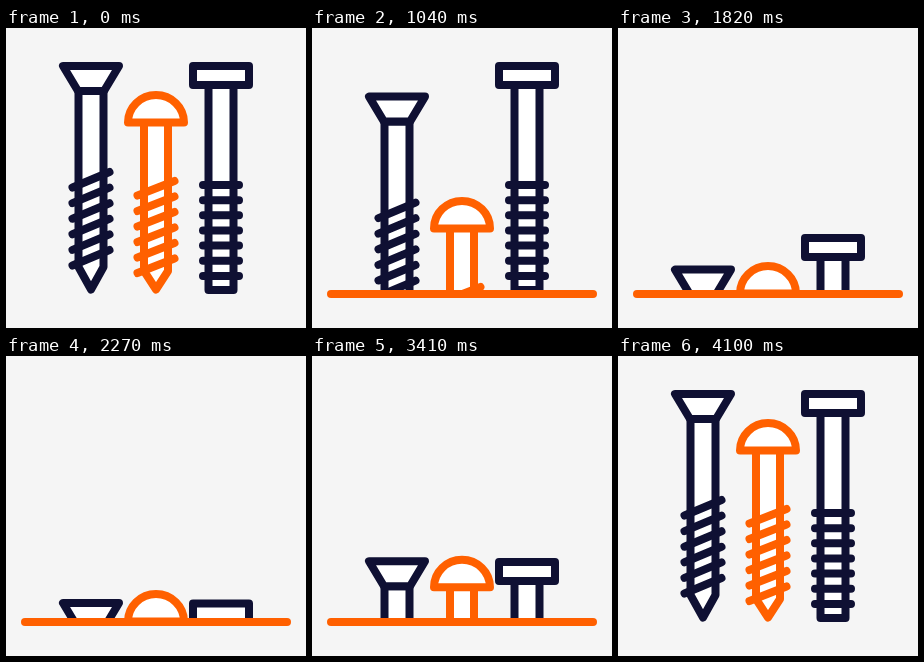
Animation, 300 px wide and 300 px high, one loop 4.16 s. Source, as an HTML page:

```html
<!DOCTYPE html>
<html lang="en">
<head>
<meta charset="utf-8">
<title>Screws</title>
<style>
  html, body { margin: 0; width: 100%; height: 100%; overflow: hidden; background: #f5f5f5; }
  svg { display: block; width: 100%; height: 100%; }
  g, #ground { stroke-width: 8; stroke-linecap: round; stroke-linejoin: round; }
  g { stroke: #0f1033; fill: #fff; }
  #round, #ground { stroke: #ff6000; }
</style>
</head>
<body>
<svg viewBox="0 0 300 300">
  <clipPath id="above"><rect width="300" height="266"/></clipPath>
  <g clip-path="url(#above)">
    <g id="flat">
      <path d="M72.5 63V239L85 261.5L97.5 239V63Z"/>
      <path d="M57 38H113L98 63H72Z"/>
    </g>
    <g id="hex">
      <path d="M202.5 57V262H227.5V57Z"/>
      <path d="M187 38H243V57H187Z"/>
    </g>
    <g id="round">
      <path d="M138 94V243L150 261.5L162 243V94Z"/>
      <path d="M122 94.5A28 27.5 0 0 1 178 94.5Z"/>
    </g>
  </g>
  <path id="ground"/>
</svg>
<script>
const LOOP = 4160;
const OUT = [0.333, 0.333];
const IN = [0.65, 0.667];
const $ = id => document.getElementById(id);

// Timing curve cubic-bezier(a, 0, b, 1)
function ease(x, [a, b]) {
  if (x <= 0) return 0;
  if (x >= 1) return 1;
  let lo = 0, hi = 1, s;
  for (let i = 0; i < 24; i++) {
    s = (lo + hi) / 2;
    const px = 3 * (1 - s) * s * ((1 - s) * a + s * b) + s ** 3;
    if (px < x) lo = s; else hi = s;
  }
  return s * s * (3 - 2 * s);
}

function addThreads(id, count, x1, x2, y, rise, pitch) {
  let d = '';
  for (let i = 0; i < count; i++) {
    const top = y + i * pitch;
    d += `M${x1} ${top + rise}L${x2} ${top}`;
  }
  const path = document.createElementNS('http://www.w3.org/2000/svg', 'path');
  path.setAttribute('d', d);
  $(id).append(path);
}

addThreads('flat', 6, 66.5, 103.5, 144, 15.5, 15.6);
addThreads('round', 6, 131.5, 168.5, 153, 14.5, 15.5);
addThreads('hex', 7, 197, 233, 157, 0, 15.15);

const screws = [
  { el: $('round'), start: 497, depth: 171 },
  { el: $('flat'), start: 797, depth: 209 },
  { el: $('hex'), start: 1097, depth: 210 }
];

function draw(t) {
  const risen = ease((t - 2900) / 1200, IN);
  for (const { el, start, depth } of screws) {
    const sunk = ease((t - start) / 1240, OUT);
    el.setAttribute('transform', `translate(0 ${(depth * (sunk - risen)).toFixed(3)})`);
  }
  const grown = ease((t - 500) / 436, OUT) - ease((t - 3660) / 436, [0.667, 0.667]);
  const half = 131 * grown;
  $('ground').setAttribute('d', half > 0.01 ? `M${150 - half} 266H${150 + half}` : '');
}

const begin = performance.now();
function tick() {
  draw((performance.now() - begin) % LOOP);
  requestAnimationFrame(tick);
}
tick();
</script>
</body>
</html>
```
